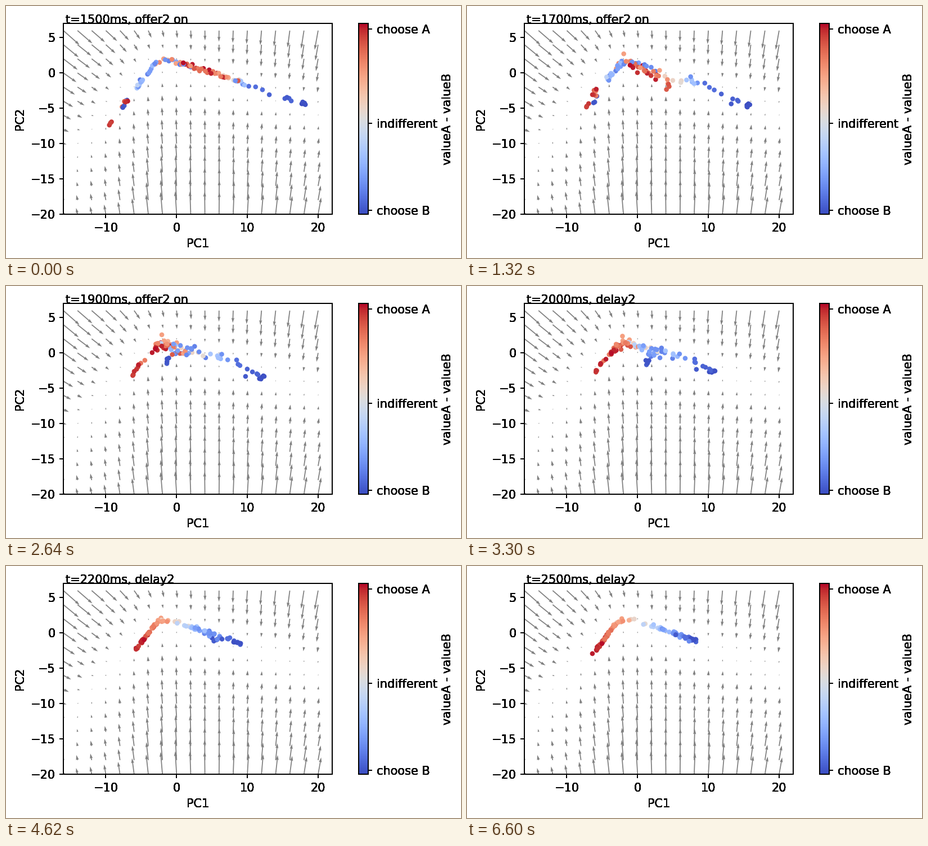
Write a matplotlib script that moves like this. It is 809 px wide and 449 px high and loops after 7920 ms.

```python
import matplotlib.pyplot as plt
import numpy as np
from matplotlib.animation import FuncAnimation
from matplotlib.cm import ScalarMappable
from matplotlib.lines import Line2D
from matplotlib.spines import Spine
from matplotlib.text import Text

W, H, DPI = 809, 449, 150
UNIT = 12.58  # pixels per data unit
STEPS, HOLD, INTERVAL = 20, 3, 330

plt.rcParams.update({"font.family": "DejaVu Sans", "font.size": 10})

# Trial clusters: first and last PC1, colour range, count
CLUSTERS = [
    (-9.5, -9.2, 0.91, 0.95, 3),
    (-7.7, -6.9, 0.8, 1.0, 6),
    (-7.6, -7.0, 0.0, 0.04, 4),
    (-5.6, -4.8, 0.04, 0.4, 10),
    (-4.1, -2.9, 0.1, 0.3, 8),
    (-3.0, 0.5, 0.65, 0.8, 7),
    (-1.6, 2.0, 0.1, 0.25, 8),
    (0.7, 3.5, 0.75, 1.0, 12),
    (3.8, 7.3, 0.7, 1.0, 14),
    (6.6, 8.8, 0.5, 0.6, 4),
    (8.3, 9.6, 0.15, 0.4, 6),
    (8.4, 8.7, 0.85, 0.95, 3),
    (10.2, 13.1, 0.05, 0.1, 4),
    (15.3, 16.2, 0.03, 0.09, 4),
    (17.7, 18.2, 0.0, 0.02, 5),
]


def ridge(x, left, right, peak_x, peak_y, width):
    """Two straight slopes joined by a rounded bend."""
    u = x - peak_x
    return (peak_y + (left + right) / 2 * u
            - (left - right) / 2 * np.hypot(u, width))


def curve(x):
    return ridge(x, 1.4, -0.34, -2.4, 2.6, 1.1)


def flow(x, y):
    """Arrow in pixels: a pull to the rest line plus a push from the left."""
    pull = ridge(x, 1.05, -0.34, -3, 2.8, 1.8) - y
    gain = 0.95 + 1.05 / (1 + np.exp(-(x + 6) / 2.5))
    dy = gain * pull * np.where(pull < 0, 1.55, 1)
    excess = 2 * np.log1p(np.exp((y - 1.4 * x - 10.5) / 2))
    dx = 24 * np.tanh(excess / 11) + 0.012 * (x - 5) * dy
    return dx, dy


def make_trials(rng):
    start = np.concatenate([np.linspace(a, b, n)
                            for a, b, _, _, n in CLUSTERS])
    level = np.concatenate([rng.uniform(lo, hi, n)
                            for _, _, lo, hi, n in CLUSTERS])
    end = 8 - 16 * level + 2 * level ** 3 + rng.normal(0, 0.7, len(level))
    order = rng.permutation(len(level))
    return start[order], end[order], level[order]


rng = np.random.default_rng(4)
start, end, level = make_trials(rng)
shift = end - start
rate = np.where(shift > 0, 1.6 - 1.25 * level, 0.95 - 0.25 * level)
sag = 0.012 * shift ** 2
start_off, mid_off, end_off = (rng.normal(0, s, len(level))
                               for s in (0.17, 0.3, 0.15))


def ease(step):
    def rise(k):
        return 1 - np.exp(-(k / 9.2) ** 1.75)
    return rise(step) / rise(STEPS)


def positions(step):
    p = ease(step) ** rate
    bump = 5.4 * p * (1 - p) ** 1.5
    x = start + shift * p
    y = curve(x) + (mid_off - sag) * bump
    y += start_off * (1 - p) + end_off * p
    return np.column_stack([x, y])


fig = plt.figure(figsize=((W + 0.01) / DPI, (H + 0.01) / DPI), dpi=DPI,
                 facecolor="white")


def add_axes(left, top, right, bottom):
    return fig.add_axes([left / W, 1 - bottom / H,
                         (right - left) / W, (bottom - top) / H])


ax = add_axes(102, 31.2, 580.1, 371)
ax.set(xlim=(-16, 22), ylim=(-20, 7), xlabel="PC1", ylabel="PC2",
       xticks=[-10, 0, 10, 20], yticks=range(-20, 6, 5))

grid_x, grid_y = np.meshgrid(np.arange(-16, 22, 2), np.arange(-20, 8, 2))
dx, dy = flow(grid_x, grid_y)
ax.quiver(grid_x, grid_y, dx / UNIT, dy / UNIT, color="grey",
          angles="xy", scale_units="xy", scale=1)
dots = ax.scatter(start, curve(start), s=17, c=level, cmap="coolwarm",
                  vmin=0, vmax=1, linewidths=0)
title = ax.text(-15.67, 7, "")

bar = fig.colorbar(ScalarMappable(cmap="coolwarm"),
                   cax=add_axes(627, 31.2, 644, 371))
bar.set_ticks([0.022, 0.476, 0.971],
              labels=["choose B", "indifferent", "choose A"])
bar.set_label("valueA - valueB")


def overdraw(artist, times=8):
    """Draw the artist repeatedly so its soft edges turn solid."""
    draw = artist.draw

    def repeat(renderer):
        for _ in range(times):
            draw(renderer)
    artist.draw = repeat


fig.draw_without_rendering()
for kind in (Text, Spine, Line2D):
    for artist in fig.findobj(kind):
        overdraw(artist)


def update(frame):
    step = min(frame, STEPS)
    time = 1500 + 50 * step
    phase = "offer2 on" if time < 2000 else "delay2"
    title.set_text(f"t={time}ms, {phase}")
    dots.set_offsets(positions(step))
    return dots, title


anim = FuncAnimation(fig, update, frames=STEPS + 1 + HOLD, interval=INTERVAL,
                     repeat=True, repeat_delay=0)
plt.show()
```
